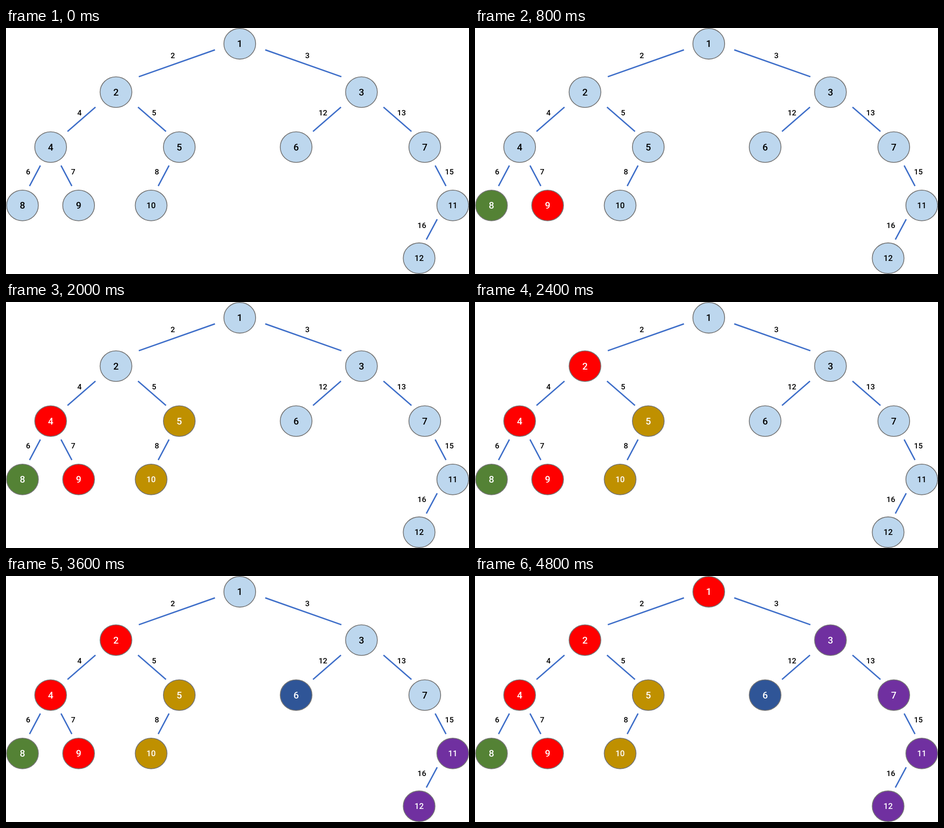
These frames come from a looping animation (1026 px wide and 546 px high, 5200 ms). An HTML page with a canvas:

```html
<!DOCTYPE html>
<html lang="en">
<head>
<meta charset="utf-8">
<title>Tree traversal</title>
<style>
html, body { margin: 0; width: 100%; height: 100%; overflow: hidden; background: #fff; }
canvas { display: block; }
</style>
</head>
<body>
<canvas id="stage" width="1026" height="546"></canvas>
<script>
const ctx = document.getElementById('stage').getContext('2d');
const STEP = 400, LOOP = 5200;
const PALE = '#bdd7ee';

// How a parent at each depth places its children: spread and gap are
// [left, right] offsets of the child and of the line start; run is the
// size of the line, tag the label's offset from the line's middle.
const levels = [
  { drop: 107.3, spread: [-274.3, 269.7], gap: [-55, 56.5], gapY: 13.5, run: [168.7, 59.7], tag: [9, -17.3] },
  { drop: 122, spread: [-144.8, 140.3], gap: [-45.4, 48.8], gapY: 33.4, run: [62, 54], tag: [4.5, -14.3] },
  { drop: 129.5, spread: [-62.4, 62], gap: [-22.7, 23], gapY: 41, run: [24, 45.4], tag: [15, -8.9] },
  { drop: 117.2, spread: [-74.5, 74.5], gap: [-34.5, 34.5], gapY: 30.7, run: [24, 45], tag: [17.5, -9] }
];

const leaf = (id, cost, color) => ({ id, cost, color, size: 1, kids: [] });

// A parent takes the colour of its largest subtree; ties go right
function node(id, cost, left, right) {
  const kids = [left, right];
  const present = kids.filter(Boolean);
  const heavy = present.reduce((a, b) => (b.size >= a.size ? b : a));
  const size = present.reduce((sum, kid) => sum + kid.size, 1);
  return { id, cost, color: heavy.color, size, kids };
}

const tree = node(1, 0,
  node(2, 2,
    node(4, 4, leaf(8, 6, '#548235'), leaf(9, 7, '#ff0000')),
    node(5, 5, leaf(10, 8, '#bf9000'))),
  node(3, 3,
    leaf(6, 12, '#2f5597'),
    node(7, 13, null, node(11, 15, leaf(12, 16, '#7030a0')))));

// Place the nodes and collect them in post-order, the visiting order
const order = [], edges = [];
function layout(n, x, y, depth) {
  const level = levels[depth];
  n.x = x;
  n.y = y;
  n.kids.forEach((kid, i) => {
    if (!kid) return;
    const side = i ? 1 : -1;
    const x1 = x + level.gap[i], y1 = y + level.gapY;
    const dx = side * level.run[0], dy = level.run[1];
    const extra = kid.cost > 9 ? 4.5 : 0;
    edges.push({
      x1, y1, x2: x1 + dx, y2: y1 + dy, text: kid.cost,
      tx: x1 + dx / 2 + side * (level.tag[0] + extra),
      ty: y1 + dy / 2 + level.tag[1]
    });
    layout(kid, x + level.spread[i], y + level.drop, depth + 1);
  });
  order.push(n);
}
layout(tree, 518, 35, 0);

function label(text, x, y, size, color) {
  ctx.font = `500 ${size}px Roboto, "Liberation Sans", sans-serif`;
  ctx.fillStyle = color;
  ctx.fillText(text, x, y + size * 0.355);
}

function drawEdge({ x1, y1, x2, y2, text, tx, ty }) {
  ctx.strokeStyle = '#3f6fc9';
  ctx.lineWidth = 3;
  ctx.beginPath();
  ctx.moveTo(x1, y1);
  ctx.lineTo(x2, y2);
  ctx.stroke();
  label(text, tx, ty, 17, '#000');
}

function drawNode({ id, x, y, color }, visited) {
  ctx.beginPath();
  ctx.ellipse(x, y, 35.2, 34, 0, 0, Math.PI * 2);
  ctx.fillStyle = visited ? color : PALE;
  ctx.fill();
  ctx.strokeStyle = '#767676';
  ctx.lineWidth = 1.8;
  ctx.stroke();
  label(id, x, y, id > 9 ? 18 : 21, visited ? '#fff' : '#000');
}

function draw(time) {
  const count = Math.floor((time % LOOP) / STEP);
  ctx.fillStyle = '#fff';
  ctx.fillRect(0, 0, 1026, 546);
  ctx.textAlign = 'center';
  edges.forEach(drawEdge);
  order.forEach((n, i) => drawNode(n, i < count));
}

const start = performance.now();
function tick() {
  draw(performance.now() - start);
  requestAnimationFrame(tick);
}
tick();
</script>
</body>
</html>
```
